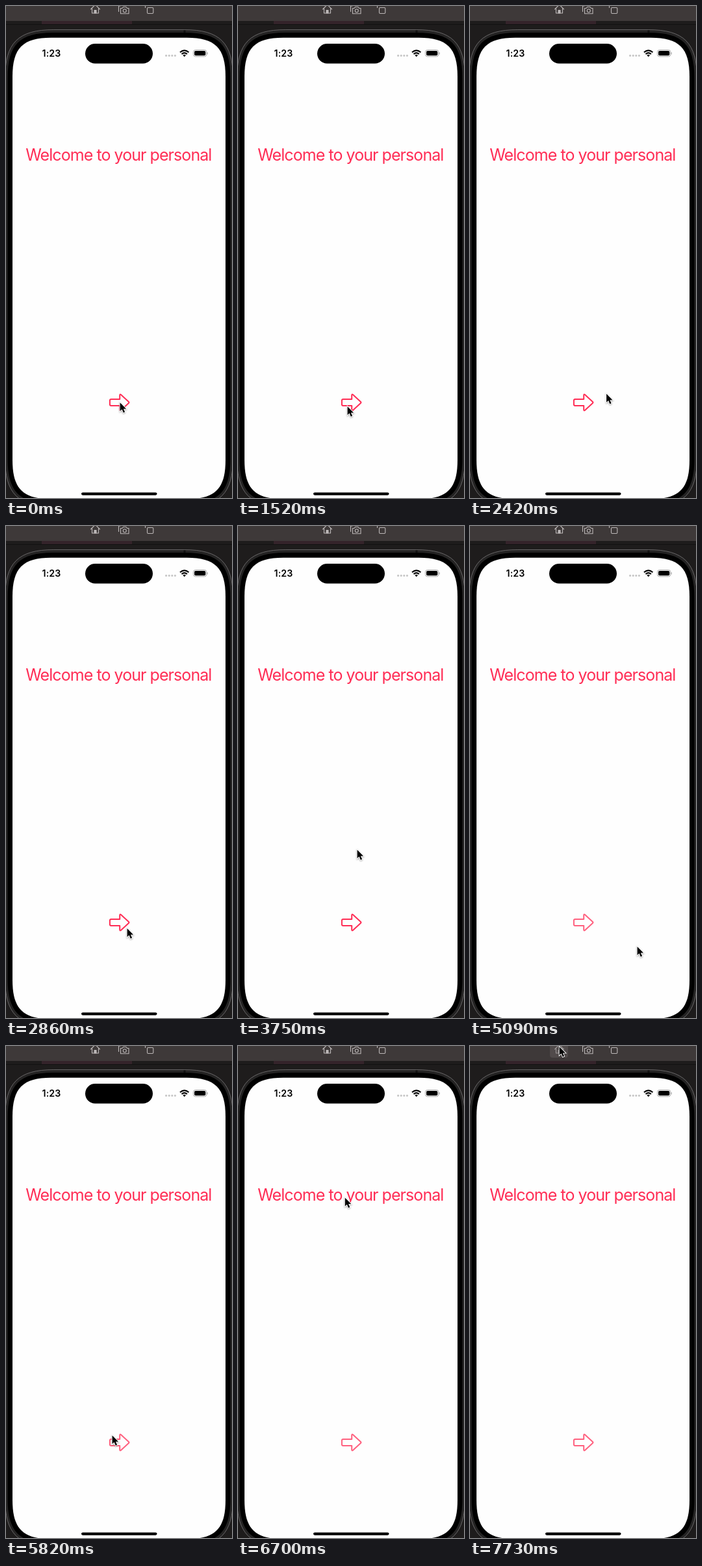
These frames come from a looping animation (348x757 px, 8000 ms). An HTML page:

```html
<!DOCTYPE html>
<html lang="en">
<head>
<meta charset="utf-8">
<title>Welcome screen</title>
<style>
  html, body { margin: 0; width: 100%; height: 100%; overflow: hidden; background: #1e1c1c; }
  svg { display: block; width: 348px; height: 757px; }
  text { font-family: Inter, "Open Sans", sans-serif; font-optical-sizing: none; }
  .icon { fill: none; stroke: #bdb8b8; stroke-width: 1.1; stroke-linejoin: round; stroke-linecap: round; }
  #cursor { filter: drop-shadow(0 1px 1px rgba(0, 0, 0, .35)); }
</style>
</head>
<body>
<svg viewBox="0 0 348 757">
  <!-- simulator toolbar -->
  <rect width="348" height="757" fill="#1e1c1c"/>
  <rect width="348" height="23" fill="#3e3939"/>
  <rect x="55" y="23" width="139" height="5" fill="#34232a"/>
  <path d="M0 28.5H348" stroke="#121111"/>
  <rect id="hover" x="123" y="-6" width="28" height="24" rx="4" fill="#514b4b"/>
  <g class="icon">
    <g id="home">
      <path d="M130.5 5L137.5-2L144.5 5M132.5 4V11H142.5V4"/>
      <path d="M136 11V6.5H139V11Z" fill="#bdb8b8"/>
    </g>
    <path d="M176.5 3.5H179L180.5 1.5H185L186.5 3.5H189V11.8H176.5ZM173.5 8.5V0H176"/>
    <circle cx="182.8" cy="7.3" r="2.5"/>
    <rect x="217.5" y="2.5" width="9.3" height="9" rx="1.5"/>
    <path d="M214.5 2.5V-.5"/>
  </g>

  <!-- phone -->
  <path id="frame" fill="#242323" stroke="#686667"/>
  <path d="M275 37V41" stroke="#111" stroke-width="3"/>
  <path id="bezel"/>
  <path id="screen" fill="#fefefe"/>
  <rect x="122" y="58" width="104" height="30.5" rx="15.25"/>
  <rect x="116" y="748.5" width="116.5" height="4.2" rx="2.1"/>

  <!-- status bar -->
  <text x="55.5" y="78" font-size="14.2" font-weight="600" letter-spacing=".15">1:23</text>
  <path d="M246.6 76.3H261" stroke="#c6c6c6" stroke-width="3.2" stroke-linecap="round" stroke-dasharray="0 4.6"/>
  <path d="M268 71.3Q274.7 65.3 281.4 71.3M270.5 74Q274.7 70.2 278.9 74" fill="none" stroke="#000" stroke-width="2.1"/>
  <path d="M272.4 75.8Q274.7 73.8 277 75.8L274.7 78.2Z"/>
  <rect x="288.5" y="67.6" width="20.3" height="10.2" rx="3.2" fill="none" stroke="#a9a9a9"/>
  <rect x="290" y="69.1" width="17.3" height="7.2" rx="2"/>
  <path d="M310.1 71.2V74.4" stroke="#a9a9a9" stroke-width="1.2"/>

  <!-- page -->
  <text x="173.3" y="238" font-size="25" letter-spacing="-.94" text-anchor="middle" fill="#ff2d55">Welcome to your personal</text>
  <path id="arrow" fill="none" stroke="#ff2d55" stroke-width="2" stroke-linejoin="round"
    d="M159.9 607Q159.9 605 161.9 605H175.2V599Q175.2 596.6 177 598.1L188.9 609Q190 610 188.9 611L177 621.9Q175.2 623.4 175.2 621V615H161.9Q159.9 615 159.9 613Z"/>

  <path id="cursor" d="M.6 1.2V14.3L3.6 11.6L5.8 16.8L8.1 15.8L5.9 10.7H10Z" stroke="#fff" stroke-width="1.8" paint-order="stroke"/>
</svg>

<script>
const LOOP = 8000, STEP = 147, DIM_AT = 4650, HOVER_AT = 7590;
const $ = id => document.getElementById(id);

// Rounded box whose corners ease into the sides.
function squircle(x, y, w, h, r) {
  const e = r * 1.3, c = e * .265, right = x + w, bottom = y + h;
  return `M${x} ${y + e}C${x} ${y + c} ${x + c} ${y} ${x + e} ${y}H${right - e}
    C${right - c} ${y} ${right} ${y + c} ${right} ${y + e}V${bottom - e}
    C${right} ${bottom - c} ${right - c} ${bottom} ${right - e} ${bottom}H${x + e}
    C${x + c} ${bottom} ${x} ${bottom - c} ${x} ${bottom - e}Z`;
}
$("frame").setAttribute("d", squircle(-1.5, 36.5, 351, 734, 58));
$("bezel").setAttribute("d", squircle(2.5, 41, 343, 725, 53.5));
$("screen").setAttribute("d", squircle(10, 48.7, 328, 709.8, 46));

// Pointer moves: start time, number of steps, points to pass on the way.
const moves = [
  [0, 1, [175, 609]],
  [780, 2, [182, 603]],
  [1520, 1, [168, 615]],
  [1670, 2, [175, 610]],
  [2420, 6, [244, 581], [186, 618], [175, 611]],
  [3750, 2, [191, 383]],
  [4200, 1, [265, 350]],
  [4350, 6, [275, 480], [257, 646]],
  [5380, 3, [215, 674], [149, 630]],
  [5820, 2, [163, 598], [165, 605]],
  [6260, 5, [164, 139]],
  [7290, 4, [137, 0]]
];

// Point at share u of a polyline whose legs take equal time.
function along(points, u) {
  const legs = points.length - 1;
  const i = Math.min(Math.floor(u * legs), legs - 1), k = u * legs - i;
  return points[i].map((v, axis) => v + (points[i + 1][axis] - v) * k);
}

function pointerAt(t) {
  const n = moves.findLastIndex(([start]) => start <= t);
  const [start, steps, ...points] = moves[n];
  const from = n ? moves[n - 1].at(-1) : points[0];
  const step = Math.min(Math.floor((t - start) / STEP) + 1, steps);
  return along([from, ...points], step / steps);
}

function draw(t) {
  $("cursor").setAttribute("transform", `translate(${pointerAt(t)})`);
  $("arrow").setAttribute("opacity", t < DIM_AT ? 1 : .75);
  $("hover").setAttribute("opacity", t < HOVER_AT ? 0 : 1);
  $("home").setAttribute("opacity", t < HOVER_AT ? 1 : .7);
}

const begin = performance.now();
function tick() {
  draw((performance.now() - begin) % LOOP);
  requestAnimationFrame(tick);
}
tick();
</script>
</body>
</html>
```
